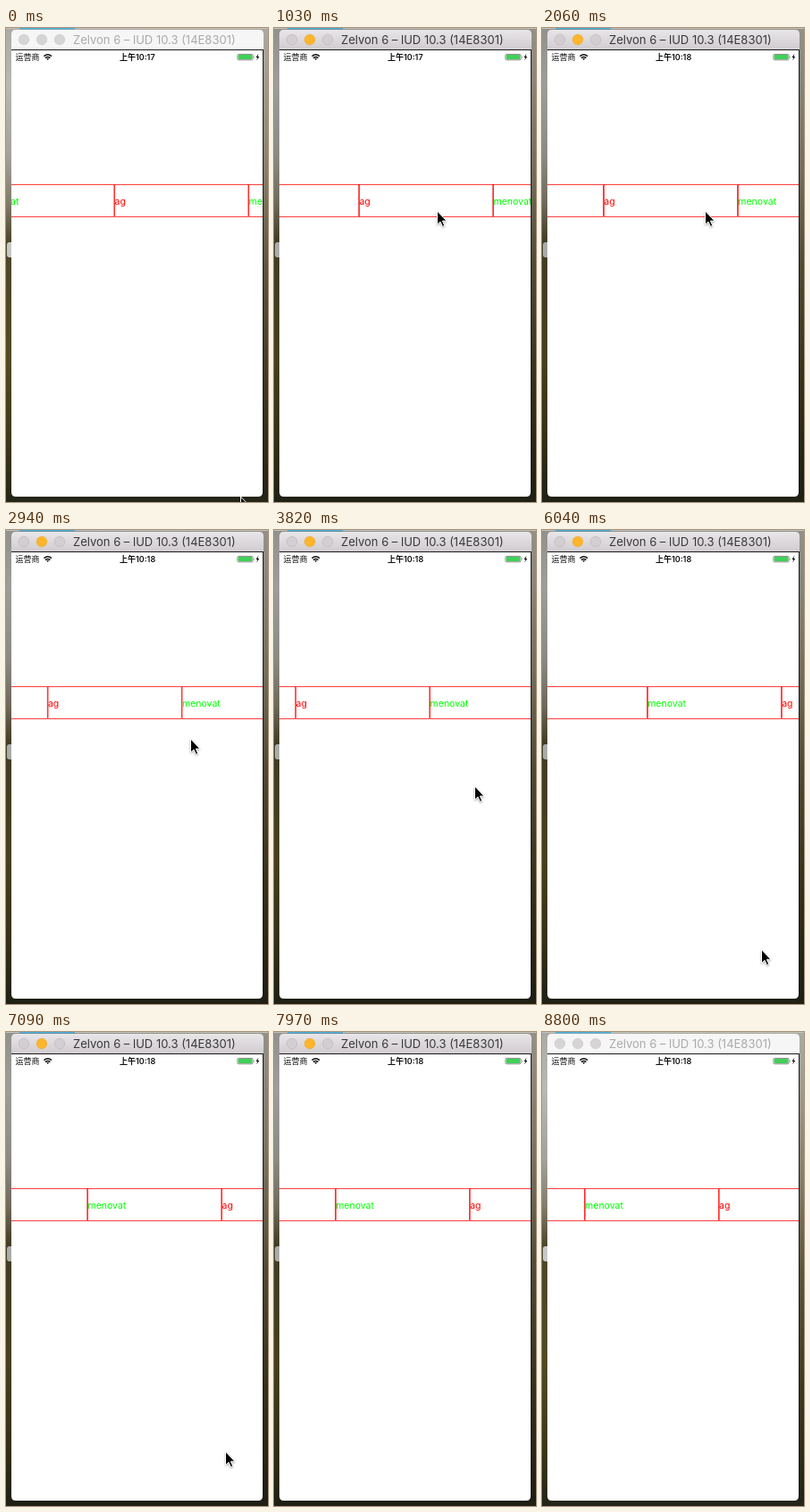
Recreate the animation shown at these times as an HTML page. Size 293 px wide and 531 px high, loop 8900 ms.

```html
<!DOCTYPE html>
<html lang="zh">
<head>
<meta charset="utf-8">
<title>Marquee in a simulator window</title>
<style>
  html, body { margin: 0; width: 293px; height: 531px; overflow: hidden; background: #333; }
  svg { display: block; }
  text { font-family: Inter, "Noto Sans CJK SC", "Noto Sans CJK", sans-serif; white-space: pre; }
  .cell rect { fill: none; stroke: #f00; stroke-width: .75; }
  .cell text { font-size: 10.5px; }
  .status { font-size: 9px; fill: #111; }
  #cursor { filter: drop-shadow(0 1px 1px rgba(0, 0, 0, .35)); }
</style>
</head>
<body>
<svg width="293" height="531" viewBox="0 0 293 531">
  <defs>
    <linearGradient id="left" x2="0" y2="1">
      <stop offset="0" stop-color="#c2c1bb"/>
      <stop offset=".12" stop-color="#d2d1cb"/>
      <stop offset=".27" stop-color="#bab7ae"/>
      <stop offset=".37" stop-color="#948c78"/>
      <stop offset=".45" stop-color="#57502f"/>
      <stop offset=".7" stop-color="#5e5426"/>
      <stop offset=".87" stop-color="#453f1c"/>
      <stop offset="1" stop-color="#2a2a18"/>
    </linearGradient>
    <linearGradient id="right" x2="0" y2="1">
      <stop offset="0" stop-color="#c4c1b7"/>
      <stop offset=".12" stop-color="#b5b0a2"/>
      <stop offset=".3" stop-color="#9a917a"/>
      <stop offset=".5" stop-color="#6b6244"/>
      <stop offset=".75" stop-color="#484022"/>
      <stop offset="1" stop-color="#26261a"/>
    </linearGradient>
    <linearGradient id="bar" x2="0" y2="1">
      <stop offset="0" stop-color="#e9e6e9"/>
      <stop offset="1" stop-color="#d0ccd0"/>
    </linearGradient>
    <clipPath id="screen"><rect x="6" y="25" width="281" height="500"/></clipPath>
  </defs>

  <rect width="147" height="531" fill="url(#left)"/>
  <rect x="147" width="146" height="531" fill="url(#right)"/>
  <rect y="525" width="293" height="6" fill="#2a2a1c"/>
  <rect x="15" width="62" height="1.4" fill="#48b4e4"/>
  <rect x="1" y="240" width="9" height="17" rx="3" fill="#e4e4e2"/>
  <rect id="shade" y="1" width="293" height="530"/>

  <path d="M6 24V7q0-5 5-5H283q5 0 5 5V24z" id="title-bar"/>
  <path d="M6 24H288V520q0 5-5 5H11q-5 0-5-5z" fill="#1a1a1a"/>
  <path d="M6 25H287V520q0 5-5 5H11q-5 0-5-5z" fill="#fff"/>
  <g id="lights" stroke-width=".6">
    <circle cx="20" cy="13" r="5.8"/>
    <circle cx="40" cy="13" r="5.8"/>
    <circle cx="60" cy="13" r="5.8"/>
  </g>
  <text id="title" x="75" y="18" font-size="13">Zelvon 6 – lUD 10.3 (14E8301)</text>

  <text class="status" x="10.5" y="36">运营商</text>
  <g fill="none" stroke="#111" stroke-width="1.4">
    <path d="M42.4 31.6q4.3-3.6 8.6 0M44 33.6q2.7-2.2 5.4 0"/>
    <path d="M45.3 34.5L46.7 36l1.4-1.5q-1.4-1-2.8 0z" fill="#111" stroke="none"/>
  </g>
  <text class="status" id="clock" x="127" y="36" font-weight="600"></text>
  <rect x="258.9" y="29.4" width="17.2" height="6.4" rx="1.4" fill="#fff" stroke="#555" stroke-width=".7"/>
  <rect x="259.7" y="30.1" width="15.6" height="5" rx=".8" fill="#3fd158"/>
  <path d="M277 31.4q1.2 1.2 0 2.4z" fill="#555"/>
  <path d="M282.4 28.8L279.4 33h1.7l-.8 3.3 3-4.4h-1.7z" fill="#111"/>

  <g clip-path="url(#screen)"><g id="strip"></g></g>
  <path id="cursor" d="M.5 1V16.2L4 13 6.5 18.4 8.8 17.4 6.4 12.1H11z"
        fill="#000" stroke="#fff" stroke-width="1"/>
</svg>
<script>
const LOOP = 8900;
const SPEED = 0.0254;   // px per ms
const START = 121.3;
const CELL = 150;
const LABELS = [['ag', '#f00'], ['menovat', '#0f0']];
const ACTIVE = [740, 8570];
const MINUTE = 1770;

// [step index, ms]; steps between entries are evenly spaced
const STEPS = [[0, 0], [1, 140], [8, 1180], [9, 1320], [16, 2360], [17, 2500], [24, 3530],
  [25, 3670], [32, 4710], [33, 4850], [40, 5890], [41, 6040], [47, 6940], [48, 7090],
  [55, 8120], [56, 8270], [58, 8570], [59, 8800]];

// [ms, x, y]
const PATH = [[0, 262, 524], [290, 243, 420], [590, 190, 225], [740, 182, 204],
  [2500, 182, 204], [2940, 206, 233], [3530, 223, 286], [3670, 224, 286], [4710, 224, 286],
  [4850, 232, 448], [5290, 245, 469], [7530, 245, 469], [7980, 253, 536], [LOOP, 253, 536]];

const $ = id => document.getElementById(id);
const strip = $('strip');
const lights = [...$('lights').children];

const times = [0];
for (let i = 1; i < STEPS.length; i++) {
  const [a, from] = STEPS[i - 1], [b, to] = STEPS[i];
  for (let k = a + 1; k <= b; k++)
    times.push(Math.round((from + (to - from) * (k - a) / (b - a)) / 10) * 10);
}

function add(parent, tag, attrs) {
  const el = document.createElementNS('http://www.w3.org/2000/svg', tag);
  for (const key in attrs) el.setAttribute(key, attrs[key]);
  return parent.appendChild(el);
}

for (let i = -1; i < 5; i++) {
  const [label, color] = LABELS[(i + 2) % 2];
  const cell = add(strip, 'g', { class: 'cell', transform: `translate(${i * CELL} 175)` });
  add(cell, 'rect', { x: .375, y: .4, width: CELL - .75, height: 36.2 });
  add(cell, 'text', { x: .3, y: 22.7, fill: color }).textContent = label;
}

function pointAt(t) {
  const i = PATH.findIndex(p => p[0] > t);
  const [t0, x0, y0] = PATH[i - 1], [t1, x1, y1] = PATH[i];
  const k = (t - t0) / (t1 - t0);
  return [x0 + (x1 - x0) * k, y0 + (y1 - y0) * k];
}

function draw(now) {
  const ms = now % LOOP;
  const t = times.filter(s => s <= ms).pop();
  const active = t >= ACTIVE[0] && t < ACTIVE[1];

  strip.setAttribute('transform', `translate(${(START - t * SPEED).toFixed(2)} 0)`);
  $('cursor').setAttribute('transform', `translate(${pointAt(t).join(' ')})`);
  $('clock').textContent = t < MINUTE ? '上午10:17' : '上午10:18';
  $('title-bar').setAttribute('fill', active ? 'url(#bar)' : '#f6f6f6');
  $('title').setAttribute('fill', active ? '#3a383a' : '#aaa');
  $('shade').setAttribute('opacity', active ? .25 : .12);
  lights.forEach((dot, i) => {
    const amber = active && i === 1;
    dot.setAttribute('fill', amber ? '#fdb52b' : active ? '#d2ced2' : '#d6d4d5');
    dot.setAttribute('stroke', amber ? '#e8a82c' : active ? '#bbb6bb' : '#cbc8ca');
  });
}

function tick() {
  draw(performance.now());
  requestAnimationFrame(tick);
}
tick();
</script>
</body>
</html>
```
